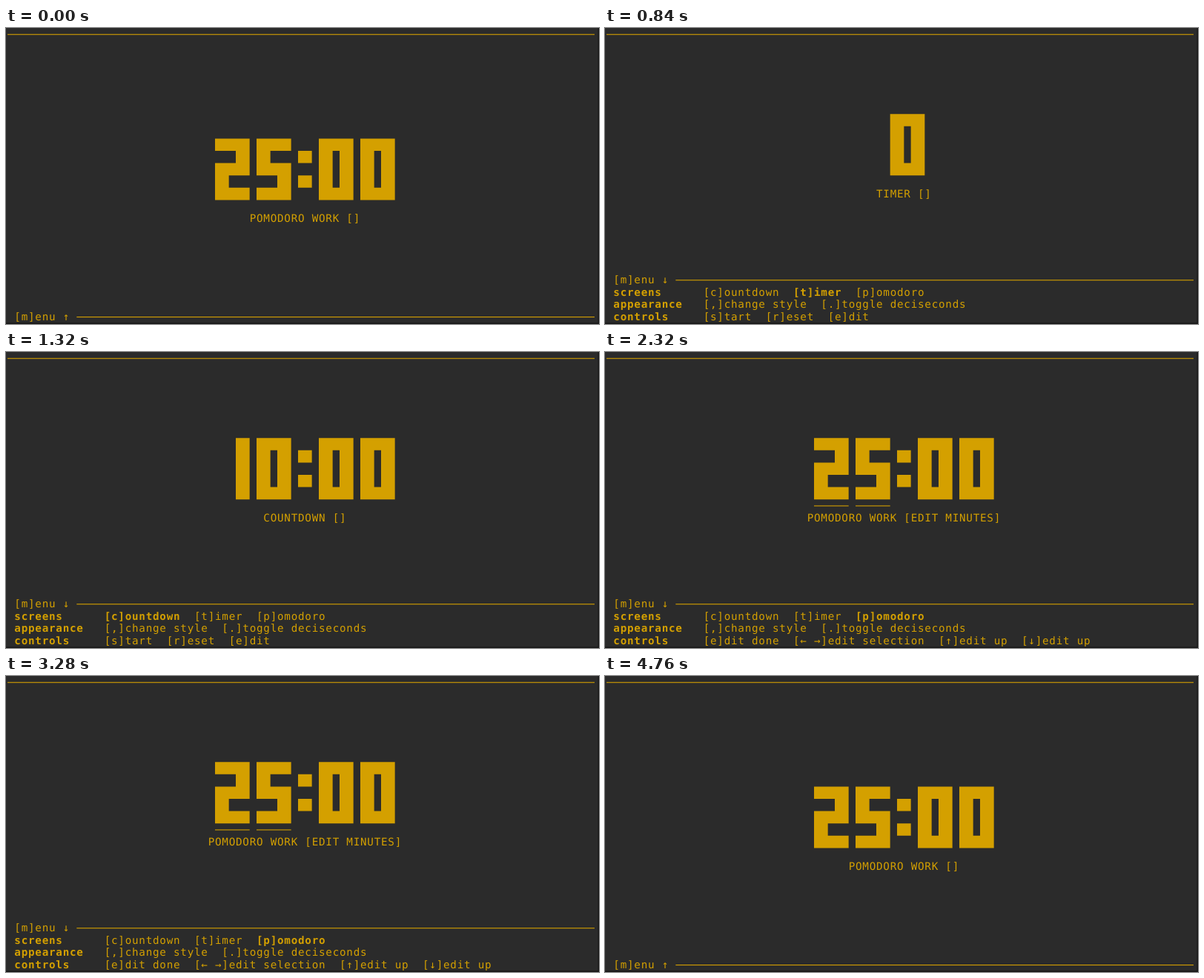
Write an HTML page with a canvas that moves like this. It is 800 by 400 pixels and loops after 4920 ms.

```html
<!DOCTYPE html>
<html lang="en">
<head>
<meta charset="utf-8">
<title>Terminal timer</title>
<style>
  html, body { margin: 0; width: 100%; height: 100%; overflow: hidden; background: #171717; }
  canvas { display: block; }
</style>
</head>
<body>
<canvas id="stage" width="800" height="400"></canvas>
<script>
const ctx = document.getElementById('stage').getContext('2d');

// Terminal grid
const LEFT = 2, CELL = 28 / 3, ROW = 16.6;
const SIZE = 14.26, BASE = 13.2, RULE_Y = 8.2, RULE_H = 1.1, RULE_END = 794;
const BACK = '#2b2b2b', EDGE = '#171717', INK = '#d4a000';
const FONT = `${SIZE}px "DejaVu Sans Mono", monospace`;
const LOOP = 4920;

const GLYPHS = {
  0: ['#####', '## ##', '## ##', '## ##', '#####'].map(r => r),
  1: Array(5).fill('   ##'),
  2: ['#####', '   ##', '#####', '##   ', '#####'],
  5: ['#####', '##   ', '#####', '   ##', '#####'],
  ':': ['  ', '##', '  ', '##', '  ']
};

const SCREENS = ['[c]ountdown', '[t]imer', '[p]omodoro'];
const BASIC = '[s]tart  [r]eset  [e]dit';
const SWITCH = BASIC + '  [← →]switch work/pause';
const EDIT = '[e]dit done  [← →]edit selection  [↑]edit up  [↓]edit up';

const work = { clock: '25:00', col: 30, label: 'POMODORO WORK []', active: 2, controls: SWITCH };
const closed = { ...work, closed: true };
const timer = { clock: '0', col: 41, label: 'TIMER []', active: 1, controls: BASIC };
const countdown = { clock: '10:00', col: 30, label: 'COUNTDOWN []', active: 0, controls: BASIC };
const minutes = { ...work, label: 'POMODORO WORK [EDIT MINUTES]', controls: EDIT, marks: [30, 36] };
const seconds = { ...minutes, label: 'POMODORO WORK [EDIT SECONDS]', marks: [45, 51] };

const TIMELINE = [
  [0, closed], [320, work], [840, timer], [1320, countdown], [1800, work],
  [2320, minutes], [2800, seconds], [3280, minutes], [3760, work], [4760, closed]
];

const colX = col => LEFT + col * CELL;

function text(str, col, row, bold) {
  ctx.font = (bold ? 'bold ' : '') + FONT;
  [...str].forEach((ch, i) => {
    if (ch !== ' ') ctx.fillText(ch, colX(col + i), row * ROW + BASE);
  });
}

function rule(x, end, row) {
  ctx.fillRect(x, row * ROW + RULE_Y, end - x, RULE_H);
}

// Fills all glyph cells as one path so that neighbours leave no seams.
function clock(str, col, row) {
  ctx.beginPath();
  for (const ch of str) {
    const rows = GLYPHS[ch];
    rows.forEach((line, r) => {
      for (const run of line.matchAll(/#+/g)) {
        ctx.rect(colX(col + run.index), (row + r) * ROW, run[0].length * CELL, ROW);
      }
    });
    col += rows[0].length + 1;
  }
  ctx.fill();
}

function menu(scene) {
  const row = scene.closed ? 23 : 20;
  text('[m]enu ' + (scene.closed ? '↑' : '↓'), 1, row);
  rule(colX(10), RULE_END, row);
  if (scene.closed) return;

  ['screens', 'appearance', 'controls'].forEach((name, i) => text(name, 1, 21 + i, true));
  let col = 14;
  SCREENS.forEach((name, i) => {
    text(name, col, 21, i === scene.active);
    col += name.length + 2;
  });
  text('[,]change style  [.]toggle deciseconds', 14, 22);
  text(scene.controls, 14, 23);
}

function draw(scene) {
  ctx.fillStyle = EDGE;
  ctx.fillRect(0, 0, 800, 400);
  ctx.fillStyle = BACK;
  ctx.fillRect(0, 0, 798.6, 398.4);

  ctx.fillStyle = INK;
  const top = scene.closed ? 9 : 7;
  rule(LEFT, RULE_END, 0);
  clock(scene.clock, scene.col, top);
  for (const col of scene.marks || []) rule(colX(col), colX(col + 5), top + 5);
  text(scene.label, 43 - scene.label.length / 2, top + 6);
  menu(scene);
}

ctx.textBaseline = 'alphabetic';
ctx.textRendering = 'geometricPrecision';

const start = performance.now();
function tick() {
  const t = (performance.now() - start) % LOOP;
  draw(TIMELINE.findLast(([from]) => t >= from)[1]);
  requestAnimationFrame(tick);
}
tick();
</script>
</body>
</html>
```
